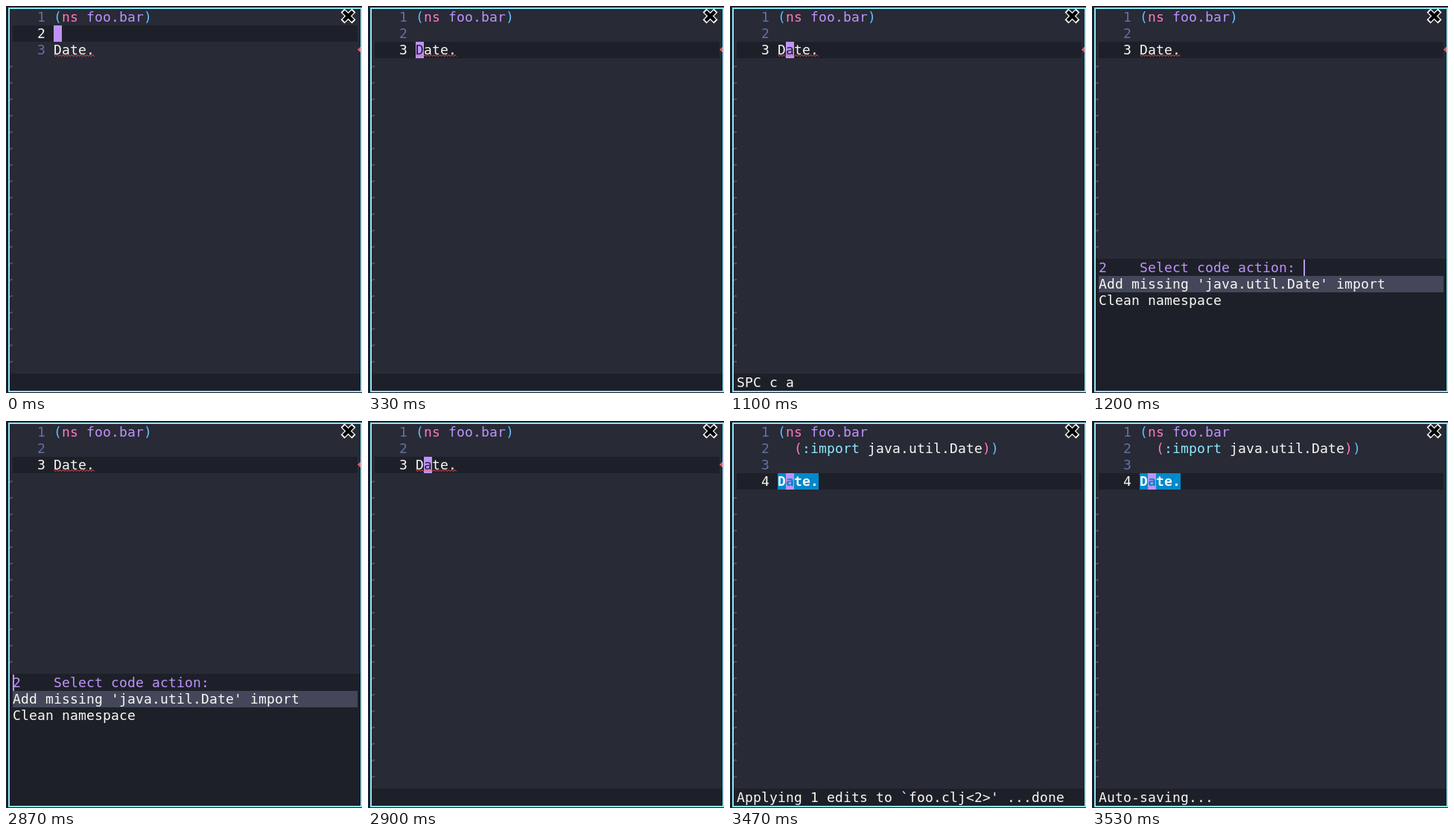
Animation, 478 px wide and 519 px high, one loop 4.33 s. Source, as an HTML page with a canvas:

```html
<!DOCTYPE html>
<html lang="en">
<head>
<meta charset="utf-8">
<title>Add missing import</title>
<style>
  html, body { margin: 0; width: 100%; height: 100%; overflow: hidden; background: #1e2029; }
  canvas { display: block; }
</style>
</head>
<body>
<canvas id="stage" width="478" height="519"></canvas>
<script>
const ctx = document.getElementById('stage').getContext('2d');
const LOOP = 4330;
const COL = 11, ROW = 22, LEFT = 9, TOP = 4, RIGHT = 472, CODE = 5;
const ECHO_TOP = 494, MENU_TOP = 340;
const C = {
  bg: '#282a36', dark: '#1e2029', fg: '#f8f8f2', number: '#6272a4', pink: '#ff79c6',
  violet: '#bd93f9', cyan: '#8be9fd', blue: '#61bfff', red: '#ff5555',
  select: '#44475a', symbol: '#0189cc', tilde: '#565761'
};

// Code lines are lists of [text, colour] runs.
const date = [['Date.', C.fg]];
const nsOpen = [['(', C.blue], ['ns', C.pink], [' foo.bar', C.violet]];
const before = [[...nsOpen, [')', C.blue]], [], date];
const rawImport = [nsOpen, [['  (:import java.util.Date)', C.fg], [')', C.blue]], [], date];
const colouredImport = [nsOpen, [
  ['  (', C.pink], [':import', C.cyan], [' java.util.Date', C.fg], [')', C.pink], [')', C.blue]
], [], date];

// Each step changes only the listed parts of the previous state.
const steps = [
  { at: 0, lines: before, row: 1, cursor: 0, error: true, symbol: false, echo: '', menu: false },
  { at: 330, row: 2 },
  { at: 600, cursor: 1 },
  { at: 930, echo: 'SPC-' },
  { at: 1030, echo: 'SPC c-' },
  { at: 1100, echo: 'SPC c a' },
  { at: 1200, echo: '', menu: true, bar: 25 },
  { at: 2870, bar: 0 },
  { at: 2900, menu: false },
  { at: 2970, lines: rawImport, row: 3, echo: "Applying 1 edits to `foo.clj<2>' ...done" },
  { at: 3470, lines: colouredImport, error: false, symbol: true },
  { at: 3530, echo: 'Auto-saving...' }
];

const stateAt = time => Object.assign({}, ...steps.filter(step => step.at <= time));
const colX = col => LEFT + col * COL;
const rowY = row => TOP + row * ROW;

function rect(color, x, y, w, h) {
  ctx.fillStyle = color;
  ctx.fillRect(x, y, w, h);
}

function text(string, col, y, color, weight = 'normal') {
  ctx.font = `${weight} 18px "DejaVu Sans Mono", monospace`;
  ctx.fillStyle = color;
  [...string].forEach((char, i) => ctx.fillText(char, colX(col + i), y + 17));
}

function stroke(points, color, width) {
  ctx.beginPath();
  points.forEach(([x, y]) => ctx.lineTo(x, y));
  ctx.strokeStyle = color;
  ctx.lineWidth = width;
  ctx.stroke();
}

function drawFrame() {
  rect(C.dark, 0, 0, 478, 519);
  rect(C.cyan, 3, 2, 475, 516);
  rect(C.bg, 5, 4, 471, 512);
}

function drawTildes(firstRow, bottom) {
  for (let y = rowY(firstRow) + 10; y < bottom - 12; y += ROW) {
    rect(C.tilde, 6, y, 3, 1);
    rect(C.tilde, 5, y + 1, 2, 1);
    rect(C.tilde, 8, y + 1, 1, 1);
    rect(C.tilde, 5, y + 2, 1, 1);
  }
}

function drawError(y) {
  for (let i = 0; i < 7; i++) {
    const width = 4 - Math.abs(i - 3);
    rect(C.red, 476 - width, y + 7 + i, width, 1);
  }
  const wave = Array.from({ length: 28 }, (_, i) => [colX(CODE) + i * 2 + .5, y + 17.5 + i % 2 * 2]);
  stroke(wave, C.red, 1);
}

function drawCode({ lines, row, cursor, error, symbol, menu }) {
  const y = rowY(row), x = colX(CODE + cursor);
  rect(C.dark, LEFT, y, RIGHT - LEFT, ROW);
  lines.forEach((runs, i) => {
    text(String(i + 1), 3, rowY(i), i === row ? C.fg : C.number);
    let col = CODE;
    for (const [string, color] of runs) {
      if (!(symbol && runs === date)) text(string, col, rowY(i), color);
      col += string.length;
    }
  });
  if (symbol) {
    rect(C.symbol, colX(CODE), y, 5 * COL, ROW);
    text('Date.', CODE, y, C.fg, 'bold');
  }
  if (!menu) {
    const char = row === lines.length - 1 ? 'Date.'[cursor] : '';
    rect(C.violet, x, y, COL, ROW);
    text(char, CODE + cursor, y, symbol ? C.symbol : C.dark, symbol ? 'bold' : 'normal');
  }
  if (error) drawError(rowY(lines.length - 1));
}

function drawMinibuffer({ menu, bar, echo }) {
  const top = menu ? MENU_TOP : ECHO_TOP;
  rect(C.dark, 5, top - 1, 471, 517 - top);
  if (!menu) return text(echo, 0, top, C.fg);
  text('2', 0, top, C.violet);
  text('Select code action:', CODE, top, C.violet);
  rect(C.violet, colX(bar), top, 2, ROW);
  rect(C.select, LEFT, top + ROW, RIGHT - LEFT, ROW);
  text("Add missing 'java.util.Date' import", 0, top + ROW, C.fg);
  text('Clean namespace', 0, top + 2 * ROW, C.fg);
}

function drawPointer() {
  ctx.lineCap = 'square';
  for (const [color, width] of [['#fff', 7], ['#000', 4.5]]) {
    const reach = color === '#fff' ? 5 : 4.6;
    for (const side of [-1, 1]) {
      stroke([[459.5 - reach, 13.5 - side * reach], [459.5 + reach, 13.5 + side * reach]], color, width);
    }
  }
  ctx.lineCap = 'butt';
}

function draw(now) {
  const state = stateAt(now % LOOP);
  drawFrame();
  drawTildes(state.lines.length, state.menu ? MENU_TOP : ECHO_TOP);
  drawCode(state);
  drawMinibuffer(state);
  drawPointer();
  requestAnimationFrame(draw);
}
requestAnimationFrame(draw);
</script>
</body>
</html>
```
